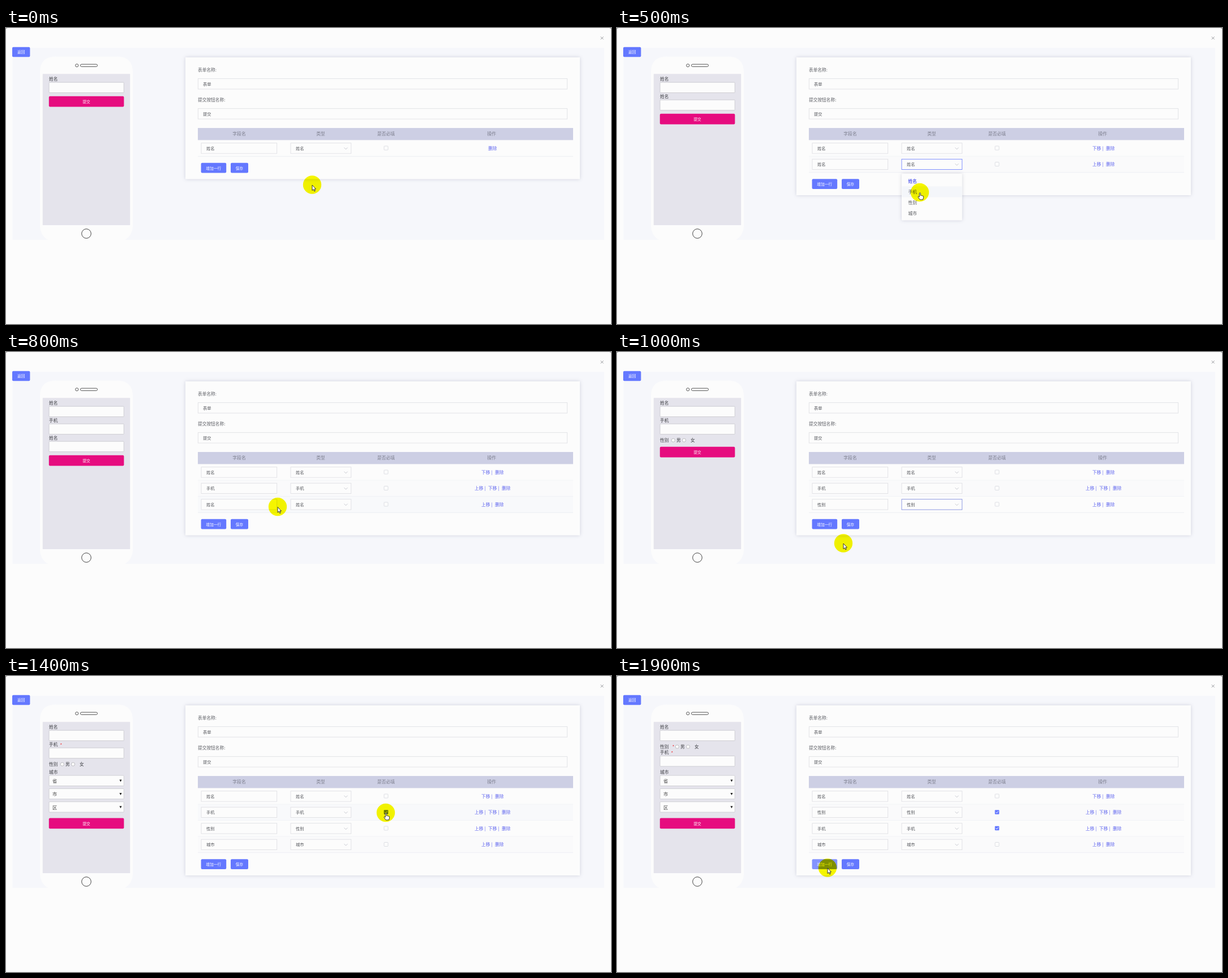
An HTML page for the animation above (2 s loop, 1069 by 524 pixels).

```html
<!DOCTYPE html>
<html>
<head>
<meta charset="utf-8">
<title>Form builder</title>
<style>
  html, body { margin: 0; width: 100%; height: 100%; overflow: hidden; background: #fcfcfc; }
  svg { display: block; width: 100%; height: 100%; isolation: isolate; }
  text { font-family: "Noto Sans CJK SC", "Noto Sans CJK", sans-serif; white-space: pre; }
  .card { filter: drop-shadow(0 0 3px rgba(40, 50, 90, .19)); }
  .halo { fill: #f8f800; mix-blend-mode: multiply; }
</style>
</head>
<body>
<svg id="stage" viewBox="0 0 1069 524"></svg>
<script>
const STEP = 100, STEPS = 20, ROW = 28.5;
const PAPER = '#fcfcfc', BLUE = '#6478ff', LINK = '#5c62ee', INK = '#55575c', LINE = '#dcdde2';
const NAMES = { n: '姓名', p: '手机', g: '性别', c: '城市' };
const KINDS = 'npgc';

// Pointer position at each step; the string tells hand (h) from arrow (a).
const path = [
  [541, 277.5], [480, 272], [402, 259], [374, 253], [420, 247],
  [535, 291], [470, 292], [369, 274], [480, 274], [532, 338],
  [400, 338.5], [450, 312], [532, 379], [610, 330], [671, 242],
  [671, 271], [835, 271], [835, 271], [600, 306], [372, 339.5]
];
const shapes = 'aaahahahahaahahhhhaa';

// Sparse state changes, each holding until overridden.
const changes = {
  0: { rows: 'n', must: '', focus: -1, menu: -1, ring: LINE },
  4: { rows: 'nn' },
  5: { focus: 1, menu: 1, ring: BLUE },
  6: { rows: 'np', menu: -1 },
  7: { ring: '#a9b3f0' },
  8: { rows: 'npn', focus: -1 },
  9: { focus: 2, menu: 2, ring: '#7482dc' },
  10: { rows: 'npg', menu: -1 },
  11: { rows: 'npgn', focus: -1 },
  12: { focus: 3, menu: 3 },
  13: { rows: 'npgc', menu: -1 },
  14: { must: 'p', focus: -1 },
  15: { must: 'pg' },
  17: { rows: 'ngpc' }
};

const rect = (x, y, w, h, fill, more = '') =>
  `<rect x="${x}" y="${y}" width="${w}" height="${h}" fill="${fill}" ${more}/>`;
const box = (x, y, w, h, stroke = LINE, r = 0) =>
  rect(x, y, w, h, PAPER, `stroke="${stroke}" stroke-width=".8" rx="${r}"`);
const line = (d, stroke, w = .8) =>
  `<path d="${d}" fill="none" stroke="${stroke}" stroke-width="${w}"/>`;
const ring = (x, y, r, stroke, w = .9) =>
  `<circle cx="${x}" cy="${y}" r="${r}" fill="${PAPER}" stroke="${stroke}" stroke-width="${w}"/>`;
// Text whose glyphs are centred vertically on y.
const text = (s, x, y, size = 7.7, fill = INK, more = '') =>
  `<text x="${x}" y="${y + size * .38}" font-size="${size}" fill="${fill}" ${more}>${s}</text>`;
const mid = (s, x, y, size, fill) => text(s, x, y, size, fill, 'text-anchor="middle"');
const button = (s, x, y, w, h, fill = BLUE) =>
  rect(x, y, w, h, fill, 'rx="2"') + mid(s, x + w / 2, y + h / 2 + .4, 6.7, '#fff');

function backdrop() {
  return rect(0, 0, 1069, 524, PAPER) +
    line('M0 .3H2M1067 .3H1069', '#777', .7) +
    line('M1050.7 15.3l5 5m0-5l-5 5', '#85878c', .8) +
    rect(11.5, 35, 1045.5, 340, '#f6f7fb') +
    button('返回', 11, 33.7, 31.4, 17.6);
}

function phone(rows, must) {
  let out = '<path d="M60 375V78Q60 50.500 88 50.500H196Q224 50.500 224 78V352Q222 369 210 375H74Q62 369 60 352Z" fill="#fcfcfc"/>' +
    rect(64.8, 81.3, 154.4, 267.7, '#e5e4ec') +
    ring(125.2, 66.3, 2.6, '#444') +
    rect(131.5, 64.2, 30, 4.2, PAPER, 'rx="2.1" stroke="#444" stroke-width=".9"') +
    ring(142, 364, 8.3, '#333');
  let y = 84;
  const label = (s, cy) => text(s, 76, cy, 7.7, '#3c3d42');
  const star = (x, cy) => text('*', x, cy + .8, 7.7, '#f02020');
  for (const kind of rows) {
    const needed = must.includes(kind);
    if (kind === 'g') {
      const dx = needed ? 7 : 0, cy = y + 9.7;
      out += label(NAMES.g, cy) + (needed ? star(97.7, cy) : '');
      for (const [s, cx, tx] of [['男', 99.3, 105], ['女', 118.5, 130]])
        out += ring(cx + dx, cy + .5, 3.1, '#a5a5aa', .7) + text(s, tx + dx, cy, 7.7, '#3c3d42');
      y += 14.3;
    } else if (kind === 'c') {
      out += label(NAMES.c, y + 9.4);
      [...'省市区'].forEach((s, i) => {
        const top = y + 15.8 + i * 23.3;
        out += box(76, top, 132.3, 18.4, '#c9c9ce', 1) + text(s, 82, top + 9.7, 8.2, '#444') +
          `<path d="M200.400 ${top + 7.5}h4.200l-2.100 4z" fill="#222"/>`;
      });
      y += 81;
    } else {
      out += label(NAMES[kind], y + 6) + (needed ? star(95.5, y + 6) : '') +
        box(76, y + 12.2, 132.3, 18.4, '#c6c6cc', 1);
      y += 31;
    }
  }
  const gap = { g: 7.4, c: 10.2 }[rows.at(-1)] || 5.8;
  return out + button('提交', 75.8, y + gap, 132.6, 18.8, '#e60c7f');
}

function links(i, n, cy, hot) {
  const items = ['删除'];
  if (i < n - 1) items.unshift('下移');
  if (i > 0) items.unshift('上移');
  const start = 864 - 12 * items.length;
  return items.map((s, k) => {
    const x = start + 24 * k;
    return text(s, x, cy, 7.7, LINK) +
      (k < items.length - 1 ? text('|', x + 17.2, cy, 7.7, LINK) : '') +
      (hot && k === 0 ? line(`M${x} ${cy + 3.8}h19`, '#333') : '');
  }).join('');
}

function tableRow(kind, i, s) {
  const cy = 213 + ROW * i, name = NAMES[kind];
  const on = s.must.includes(kind);
  const hover = Math.abs(s.y - cy) < ROW / 2 && s.menu < 0 && s.x > 339 && s.x < 1002;
  const fill = hover ? '#f8f9fb' : i % 2 ? '#fafafb' : PAPER;
  return rect(339, cy - 14.2, 663, ROW, fill) + line(`M339 ${cy + 14.2}H1002`, '#e9ebf1') +
    box(345, cy - 9.3, 133.7, 18.4) + text(name, 354, cy + .2, 7.3) +
    box(503, cy - 9.3, 106.8, 18.4, s.focus === i ? s.ring : LINE) + text(name, 512, cy + .2, 7.3) +
    line(`M597.500 ${cy - 1.300}l3 3l3-3`, '#b9bcc4') +
    (on ? rect(667.7, cy - 4.3, 7.6, 7.6, BLUE, 'rx="1"') + line(`M669.400 ${cy - .6}l1.600 1.700l2.800-3.300`, '#fff', .9)
        : box(668, cy - 4, 7, 7, '#d5d7de', 1)) +
    links(i, s.rows.length, cy, hover && s.x > 826 && s.x < 846);
}

function card(s) {
  const n = s.rows.length, drop = ROW * (n - 1), by = 238.7 + drop;
  const over = s.x > 344 && s.x < 389 && s.y > by && s.y < by + 18;
  const fill = over ? (s.step === 7 ? '#5a6ce6' : '#8393ff') : BLUE;
  let out = rect(317, 52, 697, 215.5 + drop, PAPER, 'class="card"');
  [['表单名称:', '表单', 74], ['提交按钮名称:', '提交', 127]].forEach(([name, value, y]) => {
    out += text(name, 339, y, 7.7, '#606268') + box(339.3, y + 15.7, 652.4, 18.4) + text(value, 348, y + 25, 7.3);
  });
  out += rect(339, 177, 663, 21.5, '#cdcfe4');
  [['字段名', 412], ['类型', 556], ['是否必填', 671.5], ['操作', 858]].forEach(([name, x]) => {
    out += mid(name, x, 187.5, 7.8, '#7d7f8e');
  });
  out += [...s.rows].map((kind, i) => tableRow(kind, i, s)).join('');
  return out + button('增加一行', 344.6, by, 44.6, 17.8, fill) + button('保存', 397, by, 31, 17.8);
}

function menu(s) {
  if (s.menu < 0) return '';
  const top = 229.5 + ROW * s.menu;
  return rect(503, top, 106.8, 82.6, PAPER, 'class="card" rx="1.500"') +
    [...KINDS].map((kind, i) => {
      const cy = top + 13 + 19 * i;
      return (i === s.menu ? rect(503.5, cy - 9.5, 105.8, 19, '#f4f6fa') : '') +
        text(NAMES[kind], 514.5, cy, 7.7, i ? INK : LINK, i ? '' : 'font-weight="700"');
    }).join('');
}

function pointer({ x, y, hand }) {
  const arrow = 'M0 0V9.600L2.200 7.600L3.800 11L5.300 10.300L3.800 7H6.600Z';
  const palm = 'M-.7 .8Q.3-.4 1.300 .8V5Q2.500 4.300 3.100 5.300Q4.300 4.700 4.900 5.800Q6.200 5.400 6.500 6.700V9.200L5.400 12.400H.2L-2.800 8Q-3.200 6.300-1.800 6.600L-.7 7.700Z';
  return `<circle class="halo" cx="${x}" cy="${y}" r="16.2"/>` +
    `<path transform="translate(${x} ${y + .5})" d="${hand ? palm : arrow}" fill="#fff" stroke="#222" stroke-width=".9" stroke-linejoin="round"/>`;
}

function stateAt(step) {
  const [x, y] = path[step];
  const s = { step, x, y, hand: shapes[step] === 'h' };
  for (let i = 0; i <= step; i++) Object.assign(s, changes[i]);
  return s;
}

const stage = document.getElementById('stage');
let shown = -1;
function draw(now) {
  const step = Math.floor(now / STEP) % STEPS;
  if (step !== shown) {
    const s = stateAt(step);
    stage.innerHTML = backdrop() + phone(s.rows, s.must) + card(s) + menu(s) + pointer(s);
    shown = step;
  }
}
function tick() {
  draw(performance.now() - begin);
  requestAnimationFrame(tick);
}
const begin = performance.now();
tick();
</script>
</body>
</html>
```
